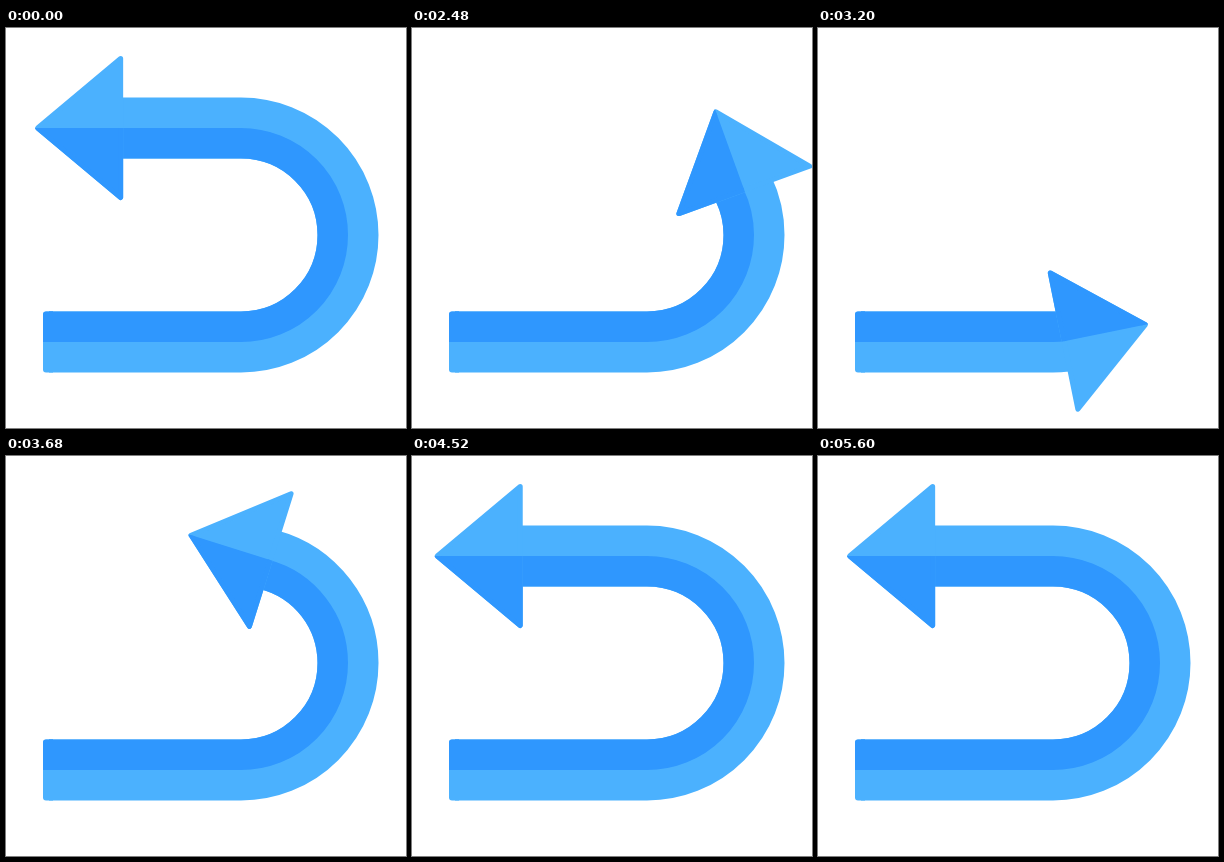
An HTML page with a canvas for the animation above (5630 ms loop, 400x400 px).

```html
<!DOCTYPE html>
<html lang="en">
<head>
<meta charset="utf-8">
<title>U-turn arrow</title>
<style>
  html, body { margin: 0; width: 100%; height: 100%; overflow: hidden; background: #fff; }
  canvas { display: block; }
</style>
</head>
<body>
<canvas id="stage" width="400" height="400"></canvas>
<script>
const ctx = document.getElementById('stage').getContext('2d');
const LIGHT = '#4bb1fe', DARK = '#2f97fe';
const LOOP = 5630;
const CX = 235, CY = 207, RADIUS = 107, HALF = 30.5, TAIL = 37;
const ARC = Math.PI * RADIUS;
const HEAD_LENGTH = 88, HEAD_HALF = 72, CORNER = 2.5;

// Head position is measured along the centre line from the start of the bend.
// x1 and x2 are the time handles of the ease that leads to the next key.
const keys = [
  { t: 2000, pos: 454, x1: .333, x2: .405 },
  { t: 3140, pos: 3.5, x1: .333, x2: .53 },
  { t: 4160, pos: 479, x1: .333, x2: .667 },
  { t: 4880, pos: 442, x1: .333, x2: .667 },
  { t: 5600, pos: 454 }
];

function ease(p, x1, x2) {
  let lo = 0, hi = 1;
  for (let i = 0; i < 24; i++) {
    const u = (lo + hi) / 2, v = 1 - u;
    if (3 * u * v * v * x1 + 3 * u * u * v * x2 + u * u * u < p) lo = u;
    else hi = u;
  }
  return lo * lo * (3 - 2 * lo);
}

function positionAt(t) {
  const next = keys.findIndex(key => key.t > t);
  if (next < 1) return keys[0].pos;
  const a = keys[next - 1], b = keys[next];
  return a.pos + (b.pos - a.pos) * ease((t - a.t) / (b.t - a.t), a.x1, a.x2);
}

function drawBand(color, radius, width, end, corners) {
  const angle = Math.min(end, ARC) / RADIUS;
  ctx.fillStyle = ctx.strokeStyle = color;
  ctx.lineWidth = width;
  ctx.beginPath();
  ctx.roundRect(TAIL, CY + radius - width / 2, 10, width, corners);
  ctx.fill();
  ctx.beginPath();
  ctx.moveTo(TAIL + 6, CY + radius);
  ctx.lineTo(CX, CY + radius);
  ctx.arc(CX, CY, radius, Math.PI / 2, Math.PI / 2 - angle, true);
  if (end > ARC) ctx.lineTo(CX - (end - ARC), CY - radius);
  ctx.stroke();
}

function fillHead(color) {
  ctx.fillStyle = ctx.strokeStyle = color;
  ctx.lineWidth = CORNER * 2;
  ctx.lineJoin = 'round';
  ctx.beginPath();
  ctx.moveTo(CORNER, CORNER - HEAD_HALF);
  ctx.lineTo(CORNER, HEAD_HALF - CORNER);
  ctx.lineTo(HEAD_LENGTH - CORNER, 0);
  ctx.closePath();
  ctx.fill();
  ctx.stroke();
}

function drawHead(pos) {
  const angle = Math.min(pos, ARC) / RADIUS;
  const degrees = angle * 180 / Math.PI;
  // The head turns a little out of step with the bend.
  const turn = Math.min(180, degrees - 3.7 + 11.5 * (1 - degrees / 105) ** 2);
  ctx.save();
  ctx.translate(CX + RADIUS * Math.sin(angle) - Math.max(0, pos - ARC),
                CY + RADIUS * Math.cos(angle));
  ctx.rotate(-turn * Math.PI / 180);
  fillHead(LIGHT);
  ctx.beginPath();
  ctx.rect(-10, -90, 120, 90);
  ctx.clip();
  fillHead(DARK);
  ctx.restore();
}

function draw(t) {
  const pos = positionAt(t);
  ctx.fillStyle = '#fff';
  ctx.fillRect(0, 0, 400, 400);
  drawBand(LIGHT, RADIUS, HALF * 2, pos + 4, [3, 0, 0, 3]);
  drawBand(DARK, RADIUS - HALF / 2, HALF, pos + 4, [3, 0, 0, 0]);
  drawHead(pos);
}

const start = performance.now();
function tick() {
  draw((performance.now() - start) % LOOP);
  requestAnimationFrame(tick);
}
tick();
</script>
</body>
</html>
```
